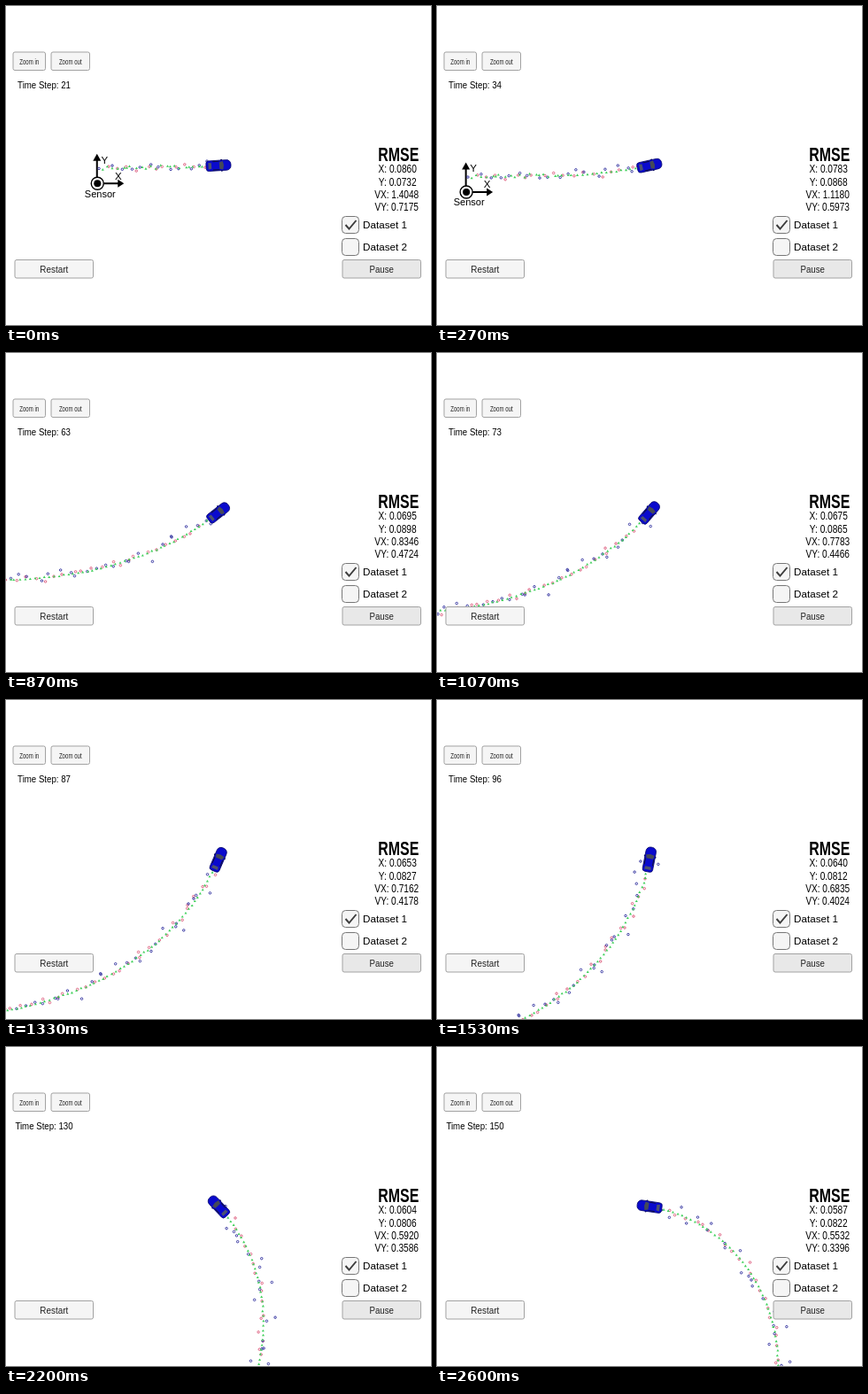
An HTML page with a canvas for the animation above (2670 ms loop, 480 px wide and 360 px high).

```html
<!DOCTYPE html>
<html lang="en">
<head>
<meta charset="utf-8">
<title>Sensor fusion tracking</title>
<style>
  html, body { margin: 0; width: 100%; height: 100%; overflow: hidden; background: #fff; }
  canvas { display: block; }
</style>
</head>
<body>
<canvas id="stage" width="480" height="360"></canvas>
<script>
const ctx = document.getElementById('stage').getContext('2d');
const LOOP = 2670, TICK = 200 / 3, LAST_TICK = 39;
const FIRST_STEP = -3, LAST_STEP = 150;
const SPEED = 5.45;
const CENTER = { x: 240, y: 180 };

const stepAt = tick => Math.floor(21 + 3.29 * tick + 0.0005 * tick * tick);

// The car drives at constant speed and turns left ever more tightly.
const headingAt = step =>
  -Math.max(1.5, -6.3 + 0.36 * step + 0.0055 * step * step) * Math.PI / 180;

const route = [{ x: 6, y: -16 }];
for (let s = FIRST_STEP; s < LAST_STEP; s++) {
  const { x, y } = route[route.length - 1], a = headingAt(s + 0.5);
  route.push({ x: x + SPEED * Math.cos(a), y: y + SPEED * Math.sin(a) });
}
const routeAt = step => route[step - FIRST_STEP];

// Velocity errors decay as power laws; the y error swings and settles.
function errorsAt(step) {
  const u = Math.log(step / 21);
  const decay = (from, rate) => from * Math.exp(-rate * u);
  return {
    X: decay(0.086, 0.194),
    Y: 0.0852 - decay(0.012, 0.5) * Math.cos(3.62 * u),
    VX: decay(1.4048, 0.474),
    VY: decay(0.7175, 0.3805)
  };
}

function noise(seed) {
  const v = Math.sin(seed * 127.1 + 3.7) * 43758.5453;
  return (v - Math.floor(v)) * 2 - 1;
}

function scatter(step, seed, spread) {
  const { x, y } = routeAt(step);
  const offset = s => noise(s) * Math.abs(noise(s + 0.5)) * spread;
  return { step, x: x + offset(step + seed), y: y + offset(step * 3 + seed + 9) };
}

const estimates = [], lidar = [], radar = [];
for (let s = FIRST_STEP; s <= LAST_STEP; s++) {
  estimates.push(scatter(s, 500, s < 22 ? 3 : 1));
  if (s % 2) radar.push(scatter(s, 900, Math.min(22, 6 + Math.max(0, s) * 0.2)));
  else lidar.push(scatter(s, 40, 7));
}

function ring(p, color) {
  ctx.strokeStyle = color;
  ctx.lineWidth = 0.9;
  ctx.beginPath();
  ctx.arc(p.x, p.y, 1.25, 0, 7);
  ctx.stroke();
}

function polygon(points, color) {
  ctx.fillStyle = color;
  ctx.beginPath();
  points.forEach(([x, y]) => ctx.lineTo(x, y));
  ctx.fill();
}

function box(x, y, w, h, r, fill, stroke, width = 1) {
  ctx.beginPath();
  ctx.roundRect(x, y, w, h, r);
  ctx.fillStyle = fill;
  ctx.fill();
  if (!stroke) return;
  ctx.strokeStyle = stroke;
  ctx.lineWidth = width;
  ctx.stroke();
}

function label(text, x, y, size, { align = 'center', weight = '', narrow = 1, color = '#000' } = {}) {
  ctx.save();
  ctx.translate(x, y);
  ctx.scale(narrow, 1);
  ctx.font = `${weight} ${size}px "Liberation Sans", Arial, sans-serif`;
  ctx.textAlign = align;
  ctx.fillStyle = color;
  ctx.fillText(text, 0, 0);
  ctx.restore();
}

function drawSensor() {
  ctx.strokeStyle = '#000';
  ctx.lineWidth = 2;
  ctx.beginPath();
  ctx.moveTo(-0.5, 0);
  ctx.lineTo(-0.5, -26);
  ctx.moveTo(0, 0.5);
  ctx.lineTo(25, 0.5);
  ctx.stroke();
  polygon([[-0.5, -33], [-5, -25], [4, -25]], '#000');
  polygon([[30, 0.5], [23, -4], [23, 5]], '#000');
  ctx.beginPath();
  ctx.arc(0, 0.5, 7, 0, 7);
  ctx.fillStyle = '#fff';
  ctx.fill();
  ctx.lineWidth = 1.4;
  ctx.stroke();
  ctx.beginPath();
  ctx.arc(0, 0.5, 4, 0, 7);
  ctx.fillStyle = '#000';
  ctx.fill();
  label('Y', 8, -22, 11.5);
  label('X', 23.5, -4, 11.5);
  label('Sensor', 3, 16, 11);
}

function drawMarks(step) {
  const seen = p => p.step <= step;
  lidar.filter(seen).forEach(p => ring(p, '#dc5578'));
  radar.filter(seen).forEach(p => ring(p, '#2c2c9c'));
  estimates.filter(seen).forEach(({ x, y }) =>
    polygon([[x, y - 1.4], [x - 1.5, y + 1.2], [x + 1.5, y + 1.2]], '#3fd05a'));
}

function drawCar(step) {
  ctx.save();
  ctx.translate(CENTER.x, CENTER.y);
  ctx.rotate(headingAt(step));
  box(2.5, -7, 2, 14, 1, '#10105a');
  box(-14, -5.8, 28, 11.6, [3, 5, 5, 3], '#0a0acd', '#08086e', 0.8);
  polygon([[1, -3.8], [5, -4.8], [6, 0], [5, 4.8], [1, 3.8]], '#454a58');
  polygon([[-11.5, -3.8], [-8, -3.2], [-8, 3.2], [-11.5, 3.8]], '#4c5270');
  for (const side of [-1, 1]) {
    polygon([[-7, 5.2], [2, 5.2], [0, 4.2], [-6, 4.2]].map(([x, y]) => [x, y * side]), '#12123c');
  }
  ctx.restore();
}

function button(text, x, y, w, h, size, narrow, fill = '#f5f5f5') {
  box(x, y, w, h, 2, fill, '#a2a2a2');
  label(text, x + w / 2, y + h / 2 + size * 0.36, size, { narrow, color: '#222' });
}

function checkbox(text, y, checked) {
  box(379.5, y, 19, 19, 4, '#f5f5f5', '#777');
  label(text, 403, y + 13.7, 11.7, { align: 'left' });
  if (!checked) return;
  ctx.strokeStyle = '#3c3c3c';
  ctx.lineWidth = 1.9;
  ctx.beginPath();
  ctx.moveTo(383.5, y + 9.5);
  ctx.lineTo(387.5, y + 14);
  ctx.lineTo(395.5, y + 4.5);
  ctx.stroke();
}

function drawPanel(step) {
  button('Zoom in', 8, 52, 36.5, 20.5, 9.5, 0.64);
  button('Zoom out', 51, 52, 43.5, 20.5, 9.5, 0.64);
  label('Time Step: ' + step, 43, 93.3, 10.5, { narrow: 0.92 });
  label('RMSE', 443.3, 174.7, 21.5, { weight: 'bold', narrow: 0.74 });
  Object.entries(errorsAt(step)).forEach(([name, value], i) =>
    label(`${name}: ${value.toFixed(4)}`, 443.2 - name.length, 188.3 + i * 14.3, 12.5,
      { narrow: 0.81 }));
  checkbox('Dataset 1', 237.5, true);
  checkbox('Dataset 2', 262.5, false);
  button('Restart', 10, 286.5, 88.5, 20.5, 10.5, 0.94);
  button('Pause', 380, 286.5, 88.5, 20.5, 10.5, 0.92, '#e8e8e8');
}

function render(now) {
  const tick = Math.min(LAST_TICK, Math.floor((now % LOOP + 4) / TICK));
  const step = stepAt(tick), car = routeAt(step);

  ctx.fillStyle = '#fff';
  ctx.fillRect(0, 0, 480, 360);
  ctx.save();
  ctx.translate(CENTER.x - car.x, CENTER.y - car.y);
  drawSensor();
  drawMarks(step);
  ctx.restore();
  drawCar(step);
  drawPanel(step);
}

let start;
function loop(now) {
  start ??= now;
  render(Math.max(0, now - start));
  requestAnimationFrame(loop);
}
render(0);
requestAnimationFrame(loop);
</script>
</body>
</html>
```
